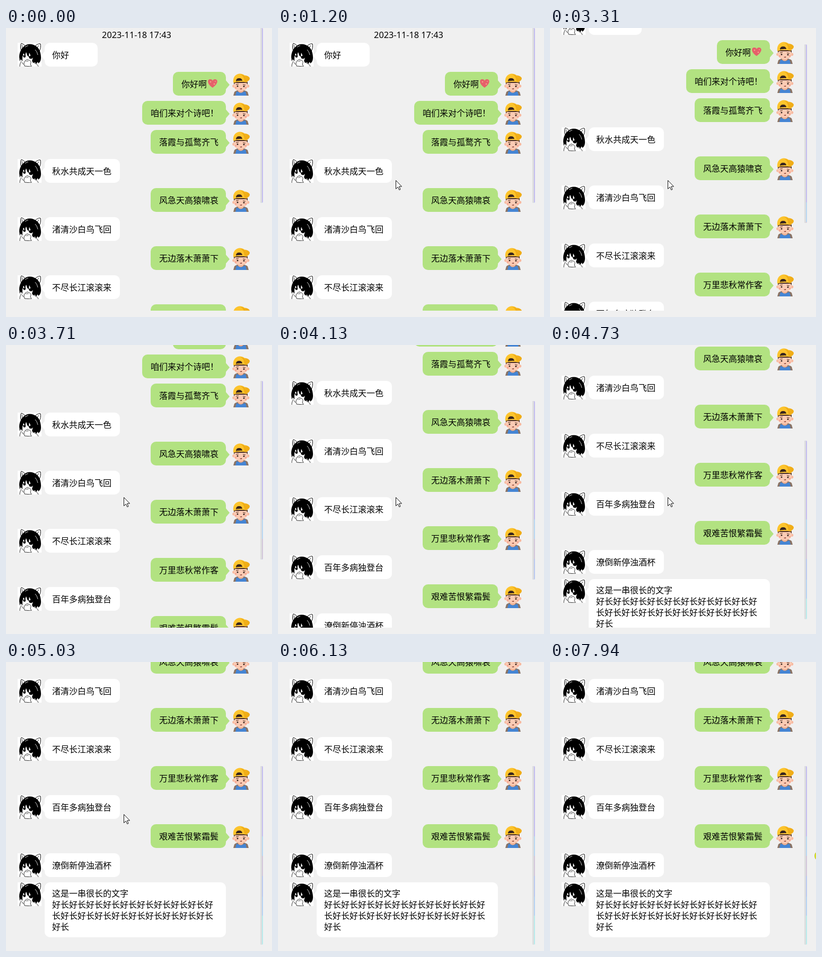
These frames come from a looping animation (502x547 px, 8 s). An HTML page:

```html
<!DOCTYPE html>
<html lang="zh-CN">
<head>
<meta charset="utf-8">
<title>聊天记录</title>
<style>
  html, body { margin: 0; width: 100%; height: 100%; overflow: hidden; background: #f0f0f0; }
  svg { position: absolute; left: 0; top: 0; display: block; }
  text { font: 16px "Noto Sans CJK SC", "Noto Sans CJK", sans-serif; fill: #000; }
  .date { font-family: "Noto Sans", "Open Sans", sans-serif; font-size: 16.3px; text-anchor: middle; }
  #bar {
    position: absolute; left: 480px; top: 0; width: 5px; height: 535px;
    background:
      linear-gradient(90deg, #dedede 3px, transparent 3px),
      linear-gradient(#c3bcf0 330px, #b8d6f2 330px 367px, #d2c6da 367px 405px,
        #b9c8f0 405px 444px, #b5d2f3 444px 480px, #b8ebec 480px);
  }
</style>
</head>
<body>
<div id="bar"></div>
<svg width="502" height="547" viewBox="0 0 502 547">
  <defs>
    <clipPath id="view"><rect width="502" height="535"/></clipPath>

    <symbol id="cat" width="45" height="45" viewBox="0 0 45 45">
      <rect width="45" height="45" fill="#fff"/>
      <path d="M7 16C5 9 5 4 7 1C10 2 13 4 15 7M33 6C37 3 40 1 43 2C44 7 43 12 41 16" fill="#fff" stroke="#000"/>
      <path d="M8 4L9 11M40 5L37 9" stroke="#000" stroke-width=".8"/>
      <path d="M3 27C3 17 8 8 16 4C23 1 31 3 37 8C42 13 44 21 44 28C44 34 42 37 39 39L38 36L35 40L33 37L29 38L27 34L29 28L26 31L25 26L22 19L21 27L18 24L16 18L14 25L11 20L9 28L9 35L6 31L4 35Z"/>
      <path d="M14 8L20 5M33 13Q37 17 38 23" fill="none" stroke="#fff" stroke-width=".8"/>
      <path d="M9 28L11 20L14 25L16 18L18 24L21 27L22 19L25 26L26 31L28 29L27 34Q22 37 16 36Q11 35 9 33Z" fill="#fff"/>
      <path d="M10 24L15 23V27Q12 29 11 27ZM21 26Q24 23 27 26L26 30Q23 31 22 29Z"/>
      <path d="M13 44C11 39 12 34 16 33C18 30 20 32 21 33C25 33 26 37 24 40L26 45Z" fill="#fff" stroke="#000" stroke-width=".8"/>
      <path d="M16 34V36M19 33V36M7 35C5 38 4 41 4 45M31 38C36 40 38 42 39 45M8 37L11 41" fill="none" stroke="#000" stroke-width=".8"/>
    </symbol>

    <symbol id="boy" width="45" height="45" viewBox="0 0 45 45">
      <path d="M9 45L11 38Q13 36 17 35H29Q34 36 36 38L38 45Z" fill="#8a7466"/>
      <path d="M13 45L15 37L19 38Q23 41 28 38L32 37L34 45Z" fill="#4585d4"/>
      <path d="M18 33H28V37Q23 42 18 37Z" fill="#f2b497"/>
      <circle cx="10" cy="27" r="2.8" fill="#f7b99f"/>
      <circle cx="36.5" cy="27" r="2.8" fill="#f7b99f"/>
      <path d="M10 18H36V26C36 33 30 36 23 36S10 33 10 26Z" fill="#fbcbb4"/>
      <path d="M10 19H36V24L34 21H12L10 24Z" fill="#4b3027"/>
      <path d="M28 7C34 6 39 9 40 12C40 16 36 19 31 19L26 16Z" fill="#f0ad17"/>
      <path d="M9 20C8 11 12 5 20 3.500C27 3 33 7 34 13L35 20Q22 17 9 20Z" fill="#fdc42d"/>
      <path d="M21 4Q29 7 30 18L35 19Q35 6 21 4Z" fill="#f0ad17"/>
      <path d="M14 18C14 13 17 12 20 12S26 13 26 18Q20 16.500 14 18Z" fill="#38251e"/>
      <path d="M9 20Q20 16 31 18.500" fill="none" stroke="#fdc42d" stroke-width="1.500"/>
      <path d="M14 24L19 23M27 24L32 25" stroke="#5b3828" stroke-width="1.2"/>
      <circle cx="17" cy="27" r="1.5" fill="#382620"/>
      <circle cx="29" cy="27.500" r="1.5" fill="#382620"/>
      <circle cx="13.500" cy="30" r="1.8" fill="#f6a593"/>
      <circle cx="32.500" cy="30" r="1.8" fill="#f6a593"/>
      <path d="M21 32L25 31L25.500 32.500Q23 34 21 32Z" fill="#8a443a"/>
    </symbol>
  </defs>

  <g clip-path="url(#view)"><g id="chat">
    <text class="date" x="246.5" y="19">2023-11-18 17:43</text>
  </g></g>
  <path id="cursor" d="M.5 .5V16.5L4.2 13L6.8 18.5L9 17.5L6.6 12H11.5Z" fill="#fff" stroke="#111" stroke-width="1"/>
  <ellipse id="edge" rx="3.5" ry="6.5" fill="#dce61e" stroke="#a9ae4a" stroke-width=".7"/>
</svg>
<script>
const LOOP = 8000, SIZE = 16, GAP = 10, LINE = 21;
const $ = id => document.getElementById(id);
const chat = $('chat');

function add(name, attrs, text) {
  const el = document.createElementNS('http://www.w3.org/2000/svg', name);
  for (const key in attrs) el.setAttribute(key, attrs[key]);
  if (text) el.textContent = text;
  return chat.appendChild(el);
}

// Leading ">" marks the sender on the right.
const long = '好长'.repeat(20);
const messages = [
  '你好', '>你好啊💖', '>咱们来对个诗吧！', '>落霞与孤鹜齐飞', '秋水共成天一色',
  '>风急天高猿啸哀', '渚清沙白鸟飞回', '>无边落木萧萧下', '不尽长江滚滚来',
  '>万里悲秋常作客', '百年多病独登台', '>艰难苦恨繁霜鬓', '潦倒新停浊酒杯',
  '这是一串很长的文字\n' + long.replace(/.{19}/g, '$&\n')
];

function heart(x, y) {
  add('path', {
    d: `M${x + 9} ${y + 16}C${x - 4} ${y + 7} ${x} ${y - 1} ${x + 5} ${y}Q${x + 8} ${y} ${x + 9} ${y + 3}Q${x + 10} ${y} ${x + 13} ${y}C${x + 19} ${y} ${x + 21} ${y + 7} ${x + 9} ${y + 16}Z`,
    fill: '#e6606a'
  });
  for (const [dx, dy, r] of [[5, 5, 1.3], [12, 9, 1.3], [14, 4, .9]])
    add('circle', { cx: x + dx, cy: y + dy, r, fill: '#f3a58c' });
}

function bubble(msg, y) {
  const right = msg[0] === '>';
  const lines = msg.replace('>', '').split('\n');
  const chars = Math.max(...lines.map(s => [...s].length));
  const multi = lines.length > 1;
  const w = multi ? 342 : Math.max(100, chars * SIZE + 30);
  const h = multi ? lines.length * LINE + 20 : 45;
  const x = right ? 415 - w : 73;
  const fill = right ? '#b2e281' : '#fff';

  add('use', { href: right ? '#boy' : '#cat', x: right ? 420 : 22, y });
  add('rect', { x, y, width: w, height: h, rx: 10, fill });
  const base = right ? 414 : 74, tip = right ? 422 : 66;
  add('path', { d: `M${base} ${y + 15}L${tip} ${y + 24.5}L${base} ${y + 34}Z`, fill });
  lines.forEach((s, i) => {
    const tx = x + (right ? 16 : 14);
    add('text', { x: tx, y: y + (multi ? 27 : 29) + i * LINE }, s.replace('💖', ''));
    if (s.includes('💖')) heart(tx + 50, y + 14);
  });
  return y + h + GAP;
}
messages.reduce((y, msg) => bubble(msg, y), 28);

// Each step [time, style] holds until the next one.
function hold(el, steps) {
  const frames = steps.map(([t, style]) => ({ offset: t / LOOP, easing: 'step-end', ...style }));
  frames.push({ ...frames[frames.length - 1], offset: 1 });
  el.animate(frames, { duration: LOOP, iterations: Infinity });
}

const scroll = [[0, 0], [3310, 60], [3710, 120], [4130, 180], [4430, 240], [4730, 300], [5030, 326]];
hold(chat, scroll.map(([t, s]) => [t, { transform: `translate(0px, ${-s}px)` }]));
hold($('bar'), scroll.map(([t, s]) => {
  const top = Math.round(s * .624 - 6.6);
  return [t, { clipPath: `inset(${Math.max(0, top)}px 0px ${535 - top - 338}px 0px round 2px)` }];
}));

const at = (x, y) => ({ transform: `translate(${Math.round(x)}px, ${Math.round(y)}px)`, opacity: 1 });
const away = { transform: 'translate(600px, 600px)', opacity: 0 };

const path = [[0, away]];
for (let i = 0; i <= 8; i++) {
  const e = 1 - (1 - i / 8) ** 2;
  path.push([200 + i * 100, at(462 - 240 * e, 538 - 244 * e)]);
}
path.push([1100, at(222, 290)], [1200, at(222, 288)]);
for (let i = 1; i <= 5; i++) {
  const e = (i / 5) ** 1.6;
  path.push([5530 + i * 100, at(222 + 249 * e, 288 + 80 * e)]);
}
path.push([6130, away]);
hold($('cursor'), path);

hold($('edge'), [[0, away], [7540, at(504, 369)], [7640, away], [7940, at(503, 367)]]);
</script>
</body>
</html>
```
